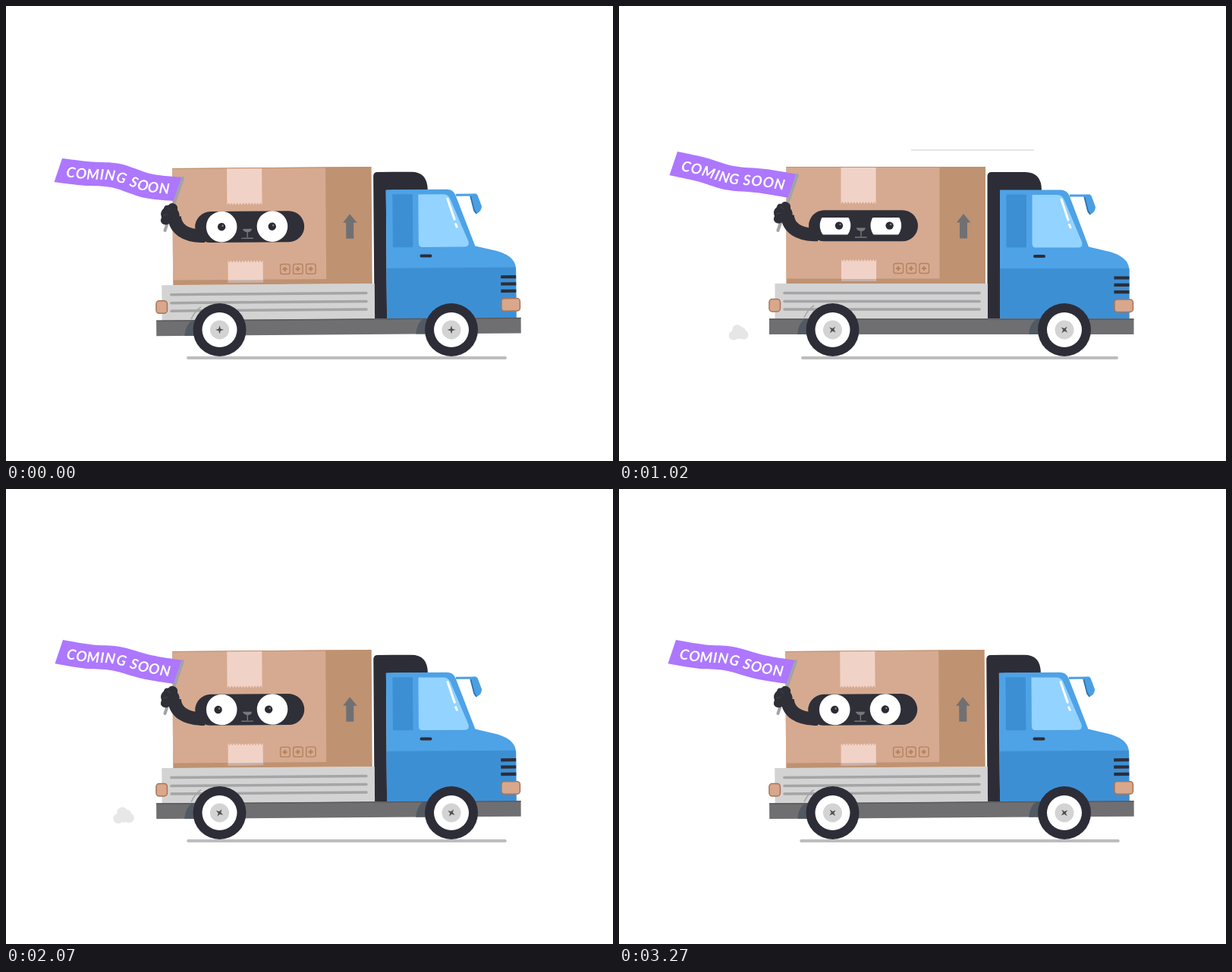
An HTML page that plays this animation: 800 by 600 pixels, repeating every 3.3 s.

```html
<!DOCTYPE html>
<html lang="en">
<head>
<meta charset="utf-8">
<title>Coming soon</title>
<style>
  html, body { margin: 0; width: 100%; height: 100%; overflow: hidden; background: #fff; }
  svg { display: block; width: 100%; height: 100%; }
  text { font: italic 700 19px Lato, "Open Sans", sans-serif; letter-spacing: .8px; fill: #fff; }
</style>
</head>
<body>
<svg viewBox="0 0 800 600">
  <defs>
    <clipPath id="lids"><rect id="lidGap" x="255" width="130"/></clipPath>
    <path id="baseline"/>
    <g id="icon" fill="none" stroke="#b5835f" stroke-width="1.4">
      <rect x="-6" y="-6.5" width="12.5" height="13" rx="2.5"/>
      <path d="M-3 0H3M0 -3V3" stroke-width="2.2"/>
    </g>
    <g id="tyre">
      <circle r="35" fill="#2d2d37"/>
      <circle r="23" fill="#fff"/>
      <circle r="12.5" fill="#d3d3d3"/>
    </g>
    <path id="star" d="M0 -5.5L1.3 -1.3L5.5 0L1.3 1.3L0 5.5L-1.3 1.3L-5.5 0L-1.3 -1.3Z" fill="#505053"/>
  </defs>
  <rect width="800" height="600" fill="#fff"/>

  <g id="wind" stroke="#e6e6e6" stroke-width="2"></g>
  <g id="smoke"></g>
  <line id="ground" y1="464" y2="464" stroke="#bdbdbd" stroke-width="4" stroke-linecap="round"/>

  <g id="truck">
    <!-- cab -->
    <path d="M485.5 412V224Q486 219 491 219H535Q557 219 557 243H502V412Z" fill="#2d2d37"/>
    <path d="M594 250H621" stroke="#4a9fe3" stroke-width="3"/>
    <path d="M612 250Q619 247.500 622.500 250L628 265Q628 272 621 275Q617 273 616.500 268Z" fill="#4a9fe3"/>
    <path d="M613.500 252L618 270L621 275" fill="none" stroke="#2f6fa8" stroke-width="1.5"/>
    <path d="M502 242.500H581Q590 242 593.500 250L619 317.500L640 322.500Q672 329 672.500 348V412.500H502Z" fill="#4ea2e6"/>
    <path d="M502 346H672.500V412.500H502Z" fill="#3d8fd4"/>
    <rect x="510.500" y="248.500" width="26.500" height="70" fill="#3d8fd4"/>
    <path d="M544.500 249H577Q584 249 586.500 255L610 311Q612 318.500 605 318.500H549Q544.500 318.500 544.500 313Z" fill="#93d3ff"/>
    <path d="M583 255L592 282M593.500 288.500L595 292" stroke="#fff" stroke-width="3" stroke-linecap="round"/>
    <path d="M548 330H560" stroke="#2d2d37" stroke-width="4" stroke-linecap="round"/>
    <path d="M652.500 358.500H672.500M652.500 367.800H672.500M652.500 377.200H672.500" stroke="#2d2d37" stroke-width="4.2"/>

    <!-- bed -->
    <rect x="205.500" y="366" width="280.500" height="47" fill="#d3d3d3"/>
    <path d="M218 378.500H475M218 389.500H475M218 400H475" stroke="#a5a5a7" stroke-width="3.5" stroke-linecap="round"/>
    <path d="M244 411Q249 400 257 395" fill="none" stroke="#a5a5a7" stroke-width="1.5"/>
    <rect x="198" y="412.500" width="480.500" height="20.500" fill="#6f6f71"/>
    <path d="M198 413H678.500" stroke="#59595d" stroke-width="1.5"/>
    <path d="M235 433Q236 419 245 412.500H256V433ZM540 433Q541 419 550 412.500H561V433Z" fill="#515a63"/>
    <g fill="#d8a78c" stroke="#a97457" stroke-width="1.5">
      <rect x="198" y="386.500" width="14.500" height="16.500" rx="4"/>
      <rect x="653" y="387" width="24.500" height="16.500" rx="4"/>
    </g>

    <!-- box -->
    <rect x="220.500" y="212" width="262.500" height="154" fill="#bf9271"/>
    <rect x="220.500" y="212.500" width="202" height="147" fill="#d6aa90"/>
    <path d="M220.500 212.500H483" stroke="#bf9271"/>
    <path id="tapeTop" fill="#f1d2c7"/>
    <path id="tapeLow" fill="#f1d2c7"/>
    <path d="M293 361.500H339" stroke="#c5b0a8" stroke-width="3"/>
    <use href="#icon" x="368" y="346"/><use href="#icon" x="385" y="346"/><use href="#icon" x="402" y="346"/>
    <path d="M454 274L463.500 285.500H459V306.500H449V285.500H445Z" fill="#707073"/>

    <!-- passenger -->
    <rect x="250" y="269.300" width="144" height="41" rx="20.500" fill="#2f2f38"/>
    <g clip-path="url(#lids)">
      <circle cx="285" cy="289.500" r="20.300" fill="#fff"/>
      <circle cx="351.800" cy="289.500" r="20.300" fill="#fff"/>
      <g id="pupils">
        <circle cx="285" cy="289.600" r="5.200" fill="#2b2b33"/>
        <circle cx="351.600" cy="289.600" r="5.200" fill="#2b2b33"/>
        <circle cx="286.500" cy="288.100" r="1.200" fill="#85858c"/>
        <circle cx="353.100" cy="288.100" r="1.200" fill="#85858c"/>
      </g>
    </g>
    <path d="M312.500 292.500H325Q324 297 319 297Q314 296.500 312.500 292.500Z" fill="#77777c"/>
    <path d="M319 296.500V304M311 305H326.500" stroke="#77777c" stroke-width="1.4" fill="none"/>
  </g>

  <g>
    <use href="#tyre" x="281.500" y="427"/><use href="#tyre" x="587" y="427"/>
    <use href="#star" class="star"/><use href="#star" class="star"/>
  </g>

  <path id="flag" fill="#ad77ff"/>
  <text><textPath href="#baseline" startOffset="50.5%" text-anchor="middle">COMING SOON</textPath></text>
  <path id="pole" stroke="#a3a3a8" stroke-width="4" stroke-linecap="round"/>
  <g id="arm">
    <path d="M222 276C223 292 236 302 262 301.500" fill="none" stroke="#2f2f38" stroke-width="17.5"/>
    <path d="M208 265Q209 260 214 261Q217 256.500 222 259Q227 261 226 267Q230 272 228 279Q224 285 217 283Q213 288.500 207 286Q202 283 205 277Q202 270 208 265Z" fill="#2f2f38"/>
    <path d="M213 264L217 268M207 274L213 273" stroke="#45454f" fill="none"/>
  </g>
</svg>
<script>
const LOOP = 3300, STEP = 30, BOUNCE = 300;
const $ = id => document.getElementById(id);
const set = (el, attrs) => { for (const k in attrs) el.setAttribute(k, attrs[k]); };
const mix = (a, b, k) => a + (b - a) * k;
const smooth = k => (1 - Math.cos(Math.PI * k)) / 2;

// Value of a [time, value] table at time t.
function at(keys, t, ease = k => k) {
  if (t <= keys[0][0]) return keys[0][1];
  for (let i = 1; i < keys.length; i++) {
    const [t0, a] = keys[i - 1], [t1, b] = keys[i];
    if (t <= t1) return mix(a, b, ease((t - t0) / (t1 - t0)));
  }
  return keys[keys.length - 1][1];
}

// Smooth curve through points, without the leading move.
function curve(p) {
  let d = '';
  for (let i = 0; i < p.length - 1; i++) {
    const a = p[Math.max(i - 1, 0)], b = p[i], c = p[i + 1], e = p[Math.min(i + 2, p.length - 1)];
    d += `C${b[0] + (c[0] - a[0]) / 6} ${b[1] + (c[1] - a[1]) / 6} ` +
         `${c[0] - (e[0] - b[0]) / 6} ${c[1] - (e[1] - b[1]) / 6} ${c[0]} ${c[1]}`;
  }
  return d;
}

// Tape strip with one saw-toothed end.
function tape(x, flat, cut, depth) {
  let d = `M${x} ${flat}V${cut}`;
  for (let i = 0; i < 12; i++) d += `l1.92 ${depth}l1.92 ${-depth}`;
  return d + `V${flat}Z`;
}
set($('tapeTop'), { d: tape(292.5, 213, 261, -3) });
set($('tapeLow'), { d: tape(293, 363, 334, 3) });

// Upper edge of the flag at five points, by bounce phase.
const WAVES = [
  [0,  [74, 113, 150, 192, 234], [201, 205.5, 208, 221.5, 226]],
  [.4, [77, 114, 151, 193, 236], [192, 200, 211, 215, 222]],
  [.8, [76, 113, 150, 192, 234], [197, 205, 208, 217, 226]]
];
WAVES.push([1, WAVES[0][1], WAVES[0][2]]);

function drawFlag(phase) {
  const top = [0, 1, 2, 3, 4].map(i =>
    [1, 2].map(n => at(WAVES.map(w => [w[0], w[n][i]]), phase, smooth)));
  const edge = k => top.map(([x, y]) => [x - 10.5 * k, y + 31.3 * k]);
  const low = edge(1).reverse(), base = edge(.725), tip = top[4];
  set($('flag'), { d: `M${top[0]}${curve(top)}L${low[0]}${curve(low)}Z` });
  set($('baseline'), { d: `M${base[0]}${curve(base)}` });
  set($('pole'), { d: `M${tip[0] - 1} ${tip[1] + 1}L209.5 296` });
}

// Streaks: height, period, head and tail positions.
const STREAKS = [
  { y: 190, every: BOUNCE, head: [[0, 570], [30, 465], [120, 385], [210, 350]],
    tail: [[0, 570], [30, 567], [120, 547], [210, 350]] },
  { y: 333, every: LOOP, head: [[400, 300], [540, 178], [620, 150]],
    tail: [[400, 300], [540, 260], [620, 150]] },
  { y: 164, every: LOOP, head: [[60, 741], [120, 640], [240, 570]],
    tail: [[60, 741], [120, 725], [240, 570]] }
];
const NS = 'http://www.w3.org/2000/svg';
const add = (parent, tag) => parent.appendChild(document.createElementNS(NS, tag));
for (const s of STREAKS) { s.el = add($('wind'), 'line'); set(s.el, { y1: s.y, y2: s.y }); }

// Exhaust puffs, two alive at most.
const PUFF = { first: 65.7, every: 259.3, count: 12, life: 284 };
const BLOBS = [[-8, 4, 7.5], [-2, -5, 8], [5, -3, 6], [8, 3, 7.5], [0, 3, 7]];
const puffs = [0, 1].map(() => {
  const g = add($('smoke'), 'g');
  for (const [cx, cy, r] of BLOBS) set(add(g, 'circle'), { cx, cy, r });
  return g;
});
function drawSmoke(t) {
  puffs.forEach(g => set(g, { visibility: 'hidden' }));
  for (let i = 0; i < PUFF.count; i++) {
    const age = t - PUFF.first - i * PUFF.every;
    if (age < 0 || age > PUFF.life) continue;
    const u = 59 * (age / PUFF.life) ** .9, c = Math.round(204 + u * .67);
    set(puffs[i % 2], {
      visibility: 'visible', fill: `rgb(${c},${c},${c})`,
      transform: `translate(${196 - u} 431) scale(${u * .67 / 31})`
    });
  }
}

const GAZE = [[680, 0], [780, 5], [1340, 5], [1440, -12.5], [2000, -12.5], [2120, 0]];
const SQUINT = [[680, 0], [780, 1], [1340, 1], [1440, 0]];
const HUBS = [[281.5, 427], [587, 427]];
const stars = document.querySelectorAll('.star');

function draw(t) {
  const phase = t % BOUNCE / BOUNCE;
  const lift = Math.min(1, (1 - Math.cos(2 * Math.PI * phase)) / 1.8);
  set($('truck'), { transform: `rotate(${-.45 * (1 - lift)} 490 400)` });
  set($('arm'), { transform: `translate(0 ${1.8 * (1 - lift)})` });
  set($('ground'), { x1: 240 + 2 * lift, x2: 658 - 2 * lift });
  drawFlag(phase);
  drawSmoke(t);

  for (const s of STREAKS) {
    const k = t % s.every, x1 = at(s.head, k), x2 = at(s.tail, k);
    set(s.el, { x1, x2, visibility: x2 - x1 > 1 ? 'visible' : 'hidden' });
  }

  const squint = at(SQUINT, t, smooth);
  set($('lidGap'), { y: mix(269, 279, squint), height: mix(43, 22.5, squint) });
  set($('pupils'), { transform: `translate(${at(GAZE, t, smooth)} 0)` });

  const turn = 4500 * t / LOOP % 360;
  HUBS.forEach(([x, y], i) => set(stars[i], { transform: `translate(${x} ${y}) rotate(${turn})` }));
}

const start = performance.now();
function tick() {
  const t = (performance.now() - start) % LOOP;
  draw(Math.floor(t / STEP) * STEP);
  requestAnimationFrame(tick);
}
draw(0);
requestAnimationFrame(tick);
</script>
</body>
</html>
```
